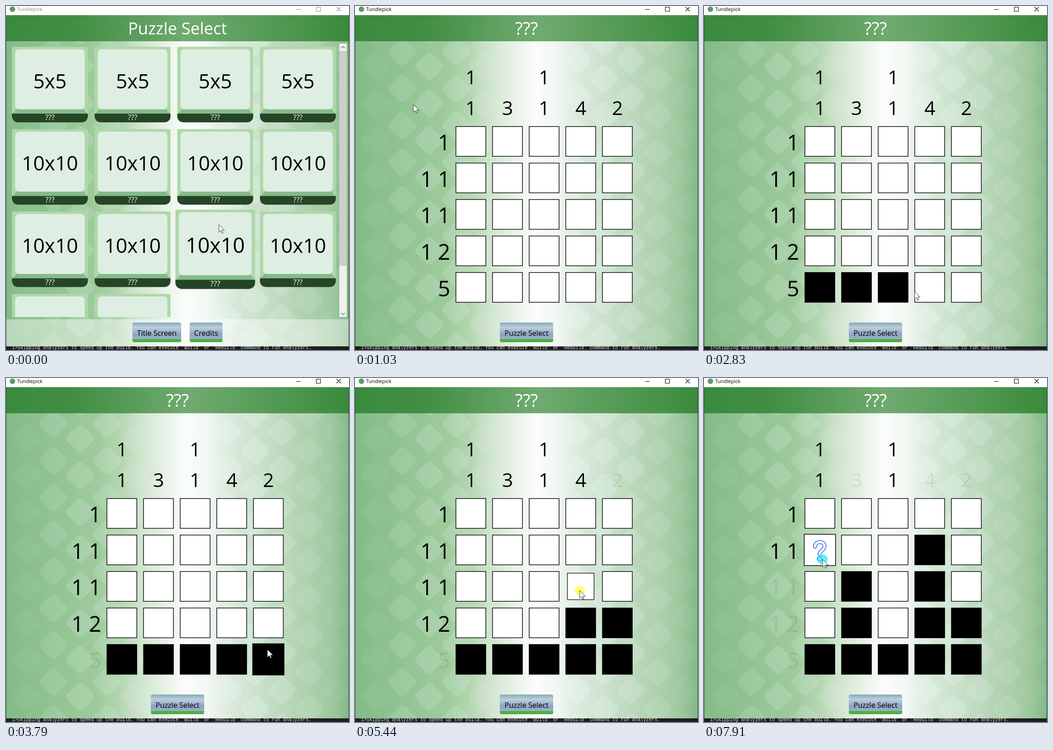
Animation, 746 px wide and 751 px high, one loop 8000 ms. Source, as an HTML page:

```html
<!DOCTYPE html>
<html lang="en">
<head>
<meta charset="utf-8">
<title>Puzzle</title>
<style>
  html, body { margin: 0; width: 100%; height: 100%; overflow: hidden; background: #1e1e1e; }
  svg { display: block; width: 746px; height: 751px; font-family: "Open Sans", "Noto Sans", sans-serif; }
  text { white-space: pre; }
  .mid { text-anchor: middle; }
  .console { font: 10.24px "Liberation Mono", monospace; fill: #ddd; }
  .cell { stroke: #000; stroke-width: 1.4; }
  .glyph { fill: none; stroke-linecap: round; }
</style>
</head>
<body>
<svg viewBox="0 0 746 751">
  <defs>
    <linearGradient id="bg">
      <stop offset="0" stop-color="#84bb88"/>
      <stop offset=".27" stop-color="#9fcb9d"/>
      <stop offset=".33" stop-color="#b2d5af"/>
      <stop offset=".4" stop-color="#d3e6d1"/>
      <stop offset=".525" stop-color="#fbfdfb"/>
      <stop offset=".59" stop-color="#f1f7f2"/>
      <stop offset=".65" stop-color="#dbeadc"/>
      <stop offset=".94" stop-color="#a2caa1"/>
      <stop offset="1" stop-color="#82b986"/>
    </linearGradient>
    <linearGradient id="bar">
      <stop offset="0" stop-color="#36883a"/>
      <stop offset=".2" stop-color="#3d8b3f"/>
      <stop offset=".53" stop-color="#69a669"/>
      <stop offset="1" stop-color="#358836"/>
    </linearGradient>
    <linearGradient id="gloss" x2="0" y2="1">
      <stop offset="0" stop-color="#86aabd"/>
      <stop offset=".25" stop-color="#bccfdb"/>
      <stop offset=".6" stop-color="#8ea3c6"/>
      <stop offset=".83" stop-color="#9db0c4"/>
      <stop offset=".84" stop-color="#4bb043"/>
    </linearGradient>
    <clipPath id="window"><rect y="20" width="746" height="723"/></clipPath>
    <clipPath id="list"><rect y="77" width="746" height="602"/></clipPath>
  </defs>

  <rect width="746" height="751" fill="#1e1e1e"/>
  <text class="console" x="13" y="749">1>Skipping analyzers to speed up the build. You can execute 'Build' or 'Rebuild' command to run analyzers.</text>

  <g clip-path="url(#window)">
    <rect width="746" height="744" fill="url(#bg)"/>
    <g id="diamonds"></g>
    <rect y="20" width="746" height="57" fill="url(#bar)" opacity=".95"/>
  </g>

  <g id="select"></g>
  <g id="puzzle"></g>

  <path d="M.5 20V743M745.5 20V743" stroke="#24402a" stroke-opacity=".75"/>
  <rect width="746" height="20" fill="#fff"/>
  <circle cx="14" cy="7" r="6" fill="#5c9a62"/>
  <g id="caption">
    <text x="24" y="11" font-size="11">Tundlepick</text>
    <path d="M631 7.5h10M675 2.5h9v9h-9zM719 2.5l9 9M728 2.5l-9 9" fill="none" stroke="currentColor" stroke-width="1.1"/>
  </g>

  <circle id="dot" r="11"/>
  <path id="cursor" d="M0 0V17L4 13.3 6.6 19 9 18 6.4 12.4H12Z" fill="#fff" stroke="#222" stroke-width=".9"/>
</svg>

<script>
const LOOP = 8000, ACTIVE = 890, SWITCH = 960, MARK = 7910, PRESS = 70, FLASH = 110;
const ROWS = ["1", "1 1", "1 1", "1 2", "5"];
const COLS = ["1 1", "3", "1 1", "4", "2"];
const STEP = 79.65, CELL = 65, CARD = 165;

const range = n => [...Array(n).keys()];
const cellX = col => 252 + STEP * col;
const cellY = row => 295.7 + STEP * row;

// a run of clicks, one every `gap` ms, on neighbouring cells
const stroke = (start, gap, count, row, col, dRow, dCol) =>
  range(count).map(i => ({ time: start + gap * i, row: row + dRow * i, col: col + dCol * i }));
const clicks = [
  ...stroke(1900, 350, 5, 4, 0, 0, 1),
  ...stroke(4080, 280, 2, 3, 4, 0, -1),
  ...stroke(5440, 280, 2, 2, 3, -1, 0),
  ...stroke(6200, 350, 2, 3, 1, -1, 0)
];

// where the pointer arrives, and when
const stop = (time, x, y) => ({ time, x, y });
const stops = [
  stop(0, 463, 477), stop(850, 118, 205), stop(1030, 127, 215), stop(1500, 131, 222),
  ...clicks.map(c => stop(c.time, cellX(c.col) - 2, cellY(c.row) + 9)),
  stop(7500, 258, 396)
];

function pointer(t) {
  const next = stops.findIndex(s => s.time > t);
  if (next < 0) return stops.at(-1);
  const a = stops[next - 1], b = stops[next];
  const travel = Math.min(b.time - a.time - PRESS, 440 + .75 * Math.hypot(b.x - a.x, b.y - a.y));
  const k = Math.max(0, 1 - (b.time - t) / travel), ease = k * k * (3 - 2 * k);
  return { x: a.x + (b.x - a.x) * ease, y: a.y + (b.y - a.y) * ease };
}

const label = (x, y, text, size, fill = "#000") =>
  `<text class="mid" x="${x}" y="${y}" font-size="${size}" fill="${fill}">${text}</text>`;
const button = (x, w, text) =>
  `<rect x="${x}" y="691" width="${w}" height="43" rx="4" fill="url(#gloss)"/>` + label(x + w / 2, 720, text, 16);

const diamonds = (x0, yEven, yOdd, opacity) => range(5).map(i => range(10).map(j =>
  `<rect x="-24" y="-24" width="48" height="48" rx="9" fill="#e6f5f2" opacity="${opacity(i)}"
    transform="translate(${x0 + i * 58.6} ${(i % 2 ? yOdd : yEven) + (j - 1) * 80.5}) rotate(45)"/>`
).join("")).join("");

const cards = range(14).map(i => ({
  x: 13 + 179.8 * (i % 4), y: 89 + 179.8 * (i >> 2), text: i < 4 ? "5x5" : "10x10"
}));
const cardArt = card => `<g class="card">
  <rect width="165" height="160" rx="3" fill="#aed8a9"/>
  <path d="M0 147L12 134H153L165 147Z" fill="#85bb8a"/>
  <rect x="7" y="5.5" width="151" height="131" rx="8" fill="#dfeee2"/>
  <path d="M0 146H165V153Q163 165 151 165H14Q2 165 0 153Z" fill="#264426"/>
  ${label(82.5, 90.5, card.text, 43.6)}${label(82.5, 160, "???", 16, "#fff")}</g>`;

const cells = range(25).map(i => ({ row: Math.floor(i / 5), col: i % 5 }));
const cellArt = `<rect class="cell" x="${-CELL / 2}" y="${-CELL / 2}" width="${CELL}" height="${CELL}"/>`;

// digits run outwards from the board
const clues = (list, cls, digit) => list.map((clue, i) =>
  `<g class="${cls}">${clue.split(" ").reverse().map((d, k) => digit(d, i, k)).join("")}</g>`).join("");

const hook = "M241.5 368C241.5 355 262 355 262 367C262 377 251.5 376 251.5 385";
const $ = id => document.getElementById(id);

$("diamonds").innerHTML =
  diamonds(44, 132, 100, i => .17 * Math.sin((i + .5) * .55)) +
  diamonds(483, 118, 159, i => .34 - .075 * i);

$("select").innerHTML =
  label(373, 62, "Puzzle Select", 36, "#fff") +
  `<g clip-path="url(#list)">${cards.map(cardArt).join("")}</g>
   <rect x="725" y="82" width="16" height="597" fill="#f0f0f0"/>
   <rect x="725" y="98" width="16" height="469" fill="#cdcdcd"/>
   <path d="M729 92l4-4 4 4M729 670l4 4 4-4" fill="none" stroke="#606060" stroke-width="1.2"/>
   <rect y="684" width="746" height="59" fill="#fff" opacity=".42"/>` +
  button(275, 106, "Title Screen") + button(399.5, 71.5, "Credits");

$("puzzle").innerHTML =
  label(373, 62.5, "???", 38.5, "#fff") +
  clues(ROWS, "row", (d, i, k) => label(193.7 - 38 * k, 315 + STEP * i, d, 47)) +
  clues(COLS, "col", (d, i, k) => label(252.2 + STEP * i, 237.5 - 66.5 * k, d, 42)) +
  cellArt.repeat(cells.length) +
  `<g id="mark" class="glyph">
     <path d="${hook}" stroke="#5b8fee" stroke-width="9"/>
     <path d="${hook}" stroke="#fff" stroke-width="4.6"/>
     <circle cx="251.5" cy="395" r="5" fill="#fff" stroke="#3f8df0" stroke-width="2.4"/>
   </g>` +
  button(315, 116, "Puzzle Select");

const all = cls => [...document.querySelectorAll("." + cls)];
const cardEls = all("card"), cellEls = all("cell"), rowEls = all("row"), colEls = all("col");
const show = (el, on) => el.setAttribute("visibility", on ? "visible" : "hidden");
const total = clue => clue.split(" ").reduce((sum, d) => sum + Number(d), 0);
const within = (p, x, y, size) => Math.abs(p.x - x) < size / 2 && Math.abs(p.y - y) < size / 2;

function drawCards(tip, t) {
  cards.forEach((card, i) => {
    const x = card.x + CARD / 2, y = card.y + CARD / 2;
    const scale = !within(tip, x, y, CARD) ? 1 : t >= ACTIVE ? .95 : 1.05;
    cardEls[i].setAttribute("transform",
      `translate(${x} ${y}) scale(${scale}) translate(${-CARD / 2} ${-CARD / 2})`);
  });
}

function drawCells(tip, t) {
  const filled = clicks.filter(c => t >= c.time + PRESS);
  const pressed = clicks.filter(c => t >= c.time && t < c.time + PRESS);
  cells.forEach((cell, i) => {
    const same = c => c.row === cell.row && c.col === cell.col;
    const x = cellX(cell.col), y = cellY(cell.row);
    const scale = pressed.some(same) ? .89 : within(tip, x, y, CELL) ? 1.05 : 1;
    cellEls[i].setAttribute("transform", `translate(${x} ${y}) scale(${scale})`);
    cellEls[i].setAttribute("fill", filled.some(same) ? "#000" : "#fff");
  });
  const dim = (els, list, axis) => els.forEach((el, i) =>
    el.setAttribute("opacity", filled.filter(c => c[axis] === i).length === total(list[i]) ? .07 : 1));
  dim(rowEls, ROWS, "row");
  dim(colEls, COLS, "col");
}

function draw() {
  const t = performance.now() % LOOP;
  const tip = pointer(t), playing = t >= SWITCH, marked = t >= MARK;
  show($("select"), !playing);
  show($("puzzle"), playing);
  show($("mark"), marked);
  (playing ? drawCells : drawCards)(tip, t);

  const tone = t >= ACTIVE ? "#000" : "#8c8c8c";
  $("caption").setAttribute("fill", tone);
  $("caption").setAttribute("color", tone);

  const flash = [ACTIVE, ...clicks.map(c => c.time)].some(start => t >= start && t < start + FLASH);
  show($("dot"), flash || marked);
  $("dot").setAttribute("fill", marked ? "rgba(60,225,245,.75)" : "rgba(255,255,80,.8)");
  for (const id of ["dot", "cursor"]) $(id).setAttribute("transform", `translate(${tip.x} ${tip.y})`);
  requestAnimationFrame(draw);
}
draw();
</script>
</body>
</html>
```
